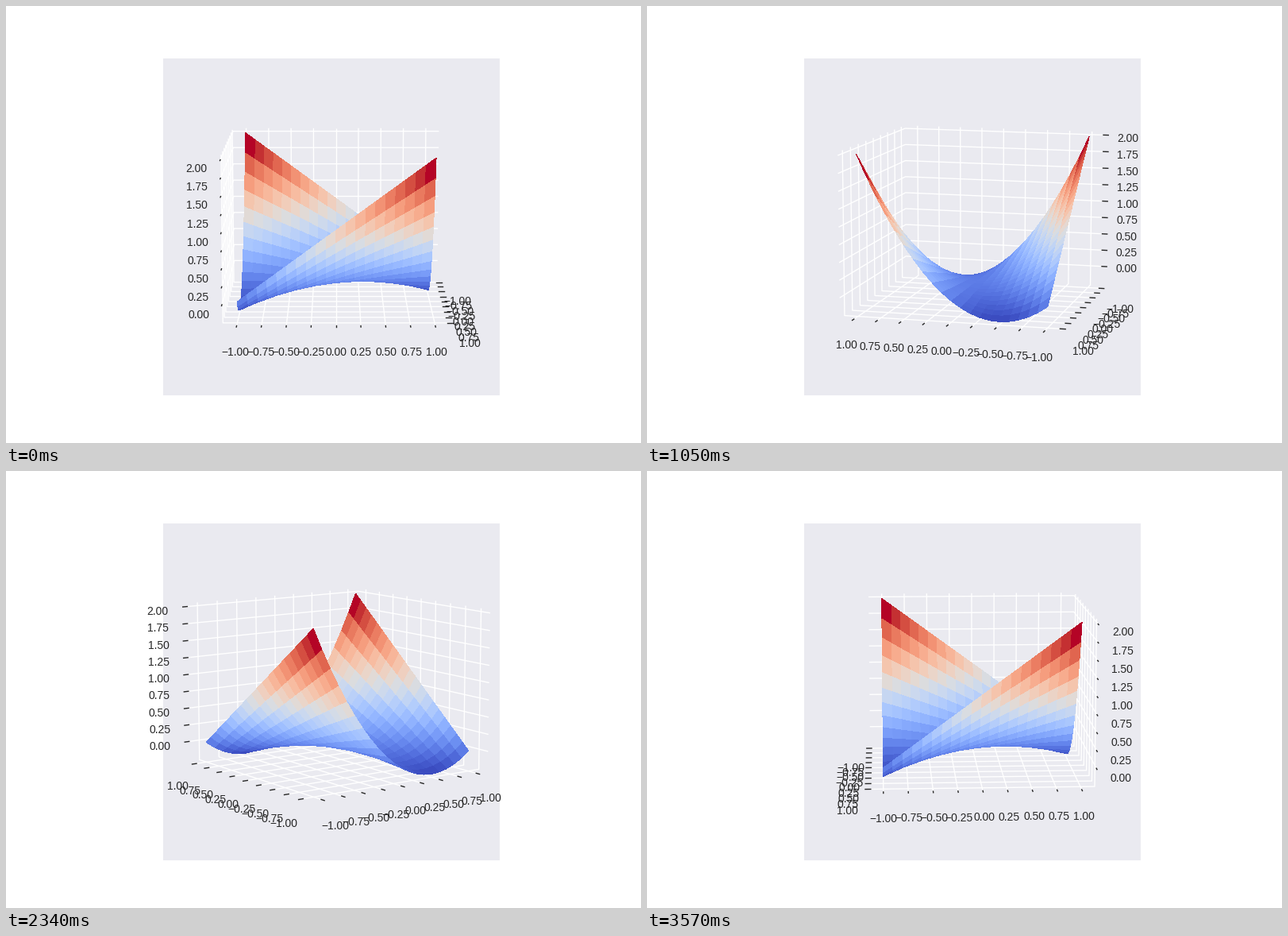
Recreate the animation shown at these times as a matplotlib script. Size 800 by 550 pixels, loop 3.6 s.

```python
import numpy as np
import matplotlib.pyplot as plt
from matplotlib.animation import FuncAnimation

FRAMES = 120
INK = "#262626"
PAPER = "#EAEAF0"

plt.rcParams.update({
    "font.family": "Liberation Sans",
    "font.size": 10,
    "axes.facecolor": PAPER,
    "axes.edgecolor": "white",
    "axes.linewidth": 0,
    "grid.color": "white",
    "grid.linewidth": 1,
    "xtick.color": INK,
    "ytick.color": INK,
    "xtick.major.pad": 7,
    "ytick.major.pad": 7,
    "xtick.major.width": 1,
    "ytick.major.width": 1,
})

fig = plt.figure(figsize=(8, 5.5), dpi=100, facecolor="white")
ax = fig.add_subplot(projection="3d")

side = np.linspace(-1, 1, 21)
x, y = np.meshgrid(side, side)
ax.plot_surface(x, y, x**2 + x * y, cmap="coolwarm", linewidth=0,
                antialiased=False)


def padded(low, high):
    """Widen a range by 1/48 of its length at each end."""
    margin = (high - low) / 48
    return low - margin, high + margin


ax.set_xlim(*padded(-1.1, 1.1))
ax.set_ylim(*padded(-1.1, 1.1))
ax.set_zlim(*padded(-0.25, 2))
ax.set_xticks(np.linspace(-1, 1, 9))
ax.set_yticks(np.linspace(-1, 1, 9))
ax.set_zticks(np.linspace(0, 2, 9))
for axis in (ax.xaxis, ax.yaxis, ax.zaxis):
    axis.set_pane_color((1, 1, 1, 0))


def turn(frame):
    ax.view_init(elev=10, azim=frame * 360 / FRAMES)
    return []


anim = FuncAnimation(fig, turn, frames=FRAMES, init_func=lambda: turn(0),
                     interval=30, repeat=True, repeat_delay=0)
plt.show()
```
